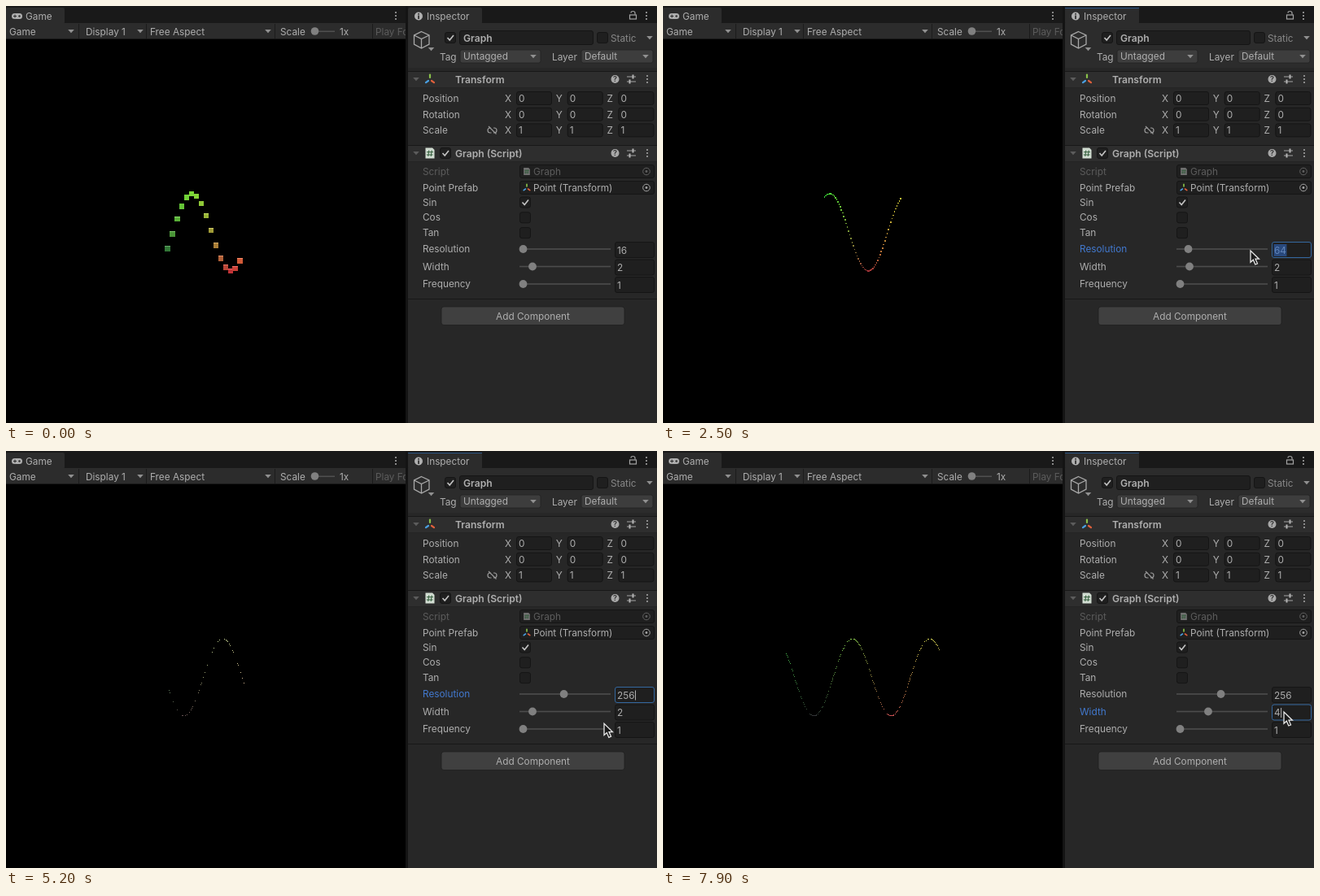
These frames come from a looping animation (800 px wide and 513 px high, 8 s). An HTML page with a canvas:

```html
<!DOCTYPE html>
<html>
<head>
<meta charset="utf-8">
<style>
html, body { margin: 0; width: 100%; height: 100%; overflow: hidden; background: #000 }
svg, canvas { position: absolute; left: 0; top: 0; display: block }
text { font: 11.8px Inter, sans-serif; fill: #aeaeae; white-space: pre }
.b { font-weight: 600; font-size: 12.1px }
.dim { fill: #5c5c5c }
</style>
</head>
<body>
<svg id="ui" width="800" height="513" viewBox="0 0 800 513"></svg>
<canvas id="view" width="490" height="513"></canvas>
<script>
const LOOP = 8000, STEP = 100;
const ui = document.getElementById('ui');
const ctx = document.getElementById('view').getContext('2d');

// --- static panel pieces ---
const rect = (x, y, w, h, fill, extra = '') =>
  `<rect x="${x}" y="${y}" width="${w}" height="${h}" fill="${fill}" ${extra}/>`;
const text = (x, y, s, cls = '', extra = '') => `<text x="${x}" y="${y}" class="${cls}" ${extra}>${s}</text>`;
const path = (d, stroke, width = 1, fill = 'none', extra = '') =>
  `<path d="${d}" stroke="${stroke}" stroke-width="${width}" fill="${fill}" ${extra}/>`;
const circle = (x, y, r, fill, extra = '') => `<circle cx="${x}" cy="${y}" r="${r}" fill="${fill}" ${extra}/>`;
const field = (x, y, w, h = 17, extra = '') =>
  rect(x + .5, y + .5, w - 1, h - 1, '#1f1f1f', `rx="2.5" stroke="#151515" ${extra}`);
const arrow = (x, y, c = '#909090') => path(`M${x - 3.8} ${y - 2}h7.6l-3.8 4.2z`, 'none', 0, c);
const dots = (x, y) => [-4, 0, 4].map(d => rect(x - .9, y + d - .9, 1.8, 1.8, '#a4a4a4')).join('');
const check = (x, y, on) => field(x, y, 14, 14) +
  (on ? path(`M${x + 3.5} ${y + 7}l2.7 3 4.8-6`, '#c4c4c4', 1.6) : '');
const dropdown = (x, w, s) => rect(x, 54, w, 16, '#3d3d3d', 'rx="2.5" stroke="#222" stroke-width=".8"') +
  text(x + 4, 66, s) + arrow(x + w - 9, 62);
const axes = (x, y, k) => `<g transform="translate(${x} ${y}) scale(${k})" stroke-linecap="round">` +
  path('M0-2V-5.5', '#8bc34a', 2.2) + path('M-2 2L-5 4.2', '#4a9fe0', 2.2) + path('M2 2L5 4.2', '#e0603c', 2.2) + '</g>';
const page = (x, y, k, c) => `<g transform="translate(${x} ${y}) scale(${k})">` +
  path('M-5.5-6.5H3L5.5-4V6.5H-5.5z', 'none', 0, c) +
  path('M-1.2-3.5L-2.2 4M2.2-3.5L1.2 4M-4-1.3H4M-4.2 2H3.6', '#2f5a38', 1) + '</g>';
const picker = (x, y, c) => circle(x, y, 4.3, 'none', `stroke="${c}"`) + circle(x, y, 1.4, c);
const header = (y, name) =>
  rect(494, y, 306, 19, '#2e2e2e') + rect(494, y - 1, 306, 1, '#181818') + rect(494, y + 19, 306, 1, '#242424') +
  arrow(504, y + 9, '#5c5c5c') + text(552, y + 13.5, name, 'b') +
  circle(748.5, y + 9, 5, '#a8a8a8') +
  text(748.5, y + 12.3, '?', 'b', 'text-anchor="middle" style="font-size:9px;fill:#2e2e2e"') +
  path(`M763 ${y + 6}h11M763 ${y + 12}h11`, '#a4a4a4', 1.2) +
  path(`M770.5 ${y + 3.5}v5M766.5 ${y + 9.5}v5`, '#b4b4b4', 2) + dots(788, y + 9);

const gamePanel = () =>
  rect(0, 0, 800, 22, '#191919') + rect(0, 2, 72, 20, '#2c2c2c', 'rx="2"') +
  rect(0, 21, 491, 20, '#2c2c2c') + rect(0, 40, 491, 1, '#171717') +
  rect(7, 9, 13, 7, '#aeaeae', 'rx="3.5"') + path('M9 12.5h4M11 10.5v4', '#2c2c2c') +
  circle(16.5, 12.5, 1.2, '#2c2c2c') +
  text(24, 17, 'Game') + dots(479, 12) +
  [89, 172, 330, 450].map(x => rect(x, 22, 1, 18, '#1b1b1b')).join('') +
  text(4, 35.5, 'Game') + arrow(80, 31) + text(98, 35.5, 'Display 1') + arrow(165, 31) +
  text(177, 35.5, 'Free Aspect') + arrow(322, 31) + text(337, 35.5, 'Scale') +
  rect(375, 30.5, 29, 1.5, '#505050') + circle(379.5, 31, 4.8, '#808080') + text(410, 35.5, '1x') +
  text(454, 35.5, 'Play Focused', 'dim') + rect(491, 0, 3, 513, '#141414');

const objectHeader = () =>
  rect(494, 21, 306, 492, '#272727') + rect(494, 2, 91, 20, '#2c2c2c', 'rx="2"') +
  rect(494, 21, 306, 55, '#2c2c2c') +
  circle(507, 12.5, 5, '#b0b0b0') + rect(506.2, 11.5, 1.7, 4.5, '#2c2c2c') + rect(506.2, 9, 1.7, 1.6, '#2c2c2c') +
  text(517, 17, 'Inspector') +
  rect(766.5, 11, 8, 5, 'none', 'stroke="#a4a4a4" stroke-width="1.2"') +
  path('M768 8.5q0-2 2.5-2t2.5 2v2', '#a4a4a4', 1.2) + dots(787, 12) +
  path('M510.5 31.5L520 36V47L510.5 52 501.5 47V36zM501.5 36l9 4.5 9.5-4.5M510.5 40.5V52', '#a8a8a8', 1.3) +
  arrow(522.5, 53) + check(539, 32, true) + field(557, 30, 165, 18) + text(562, 43.5, 'Graph', 'b') +
  check(726, 32) + text(743, 43.5, 'Static', '', 'style="fill:#888"') + arrow(791, 39) +
  text(533, 66.5, 'Tag') + dropdown(558, 99, 'Untagged') + text(671, 66.5, 'Layer') + dropdown(707, 88, 'Default');

const transformPart = () => header(81, 'Transform') + axes(521, 90, 1) +
  ['Position', 'Rotation', 'Scale'].map((name, i) => {
    const y = 105 + i * 19.7;
    return text(512, y + 13, name) + ['X', 'Y', 'Z'].map((axis, j) => {
      const x = 627 + j * 62.7;
      return text(x - 14, y + 13, axis) + field(x, y, 44) + text(x + 3, y + 13, i < 2 ? 0 : 1);
    }).join('');
  }).join('') +
  path('M596 150h-1a3 3 0 0 0 0 6h1.5M599 150h1a3 3 0 0 1 0 6H599M593 148l9.5 9.5', '#999', 1.2);

const scriptPart = () => header(172, 'Graph (Script)') + page(521, 181, 1, '#d2ddd2') + check(533, 174, true) +
  text(512, 208, 'Script', 'dim') + field(631, 195, 166) + page(640, 203.5, .7, '#707070') +
  text(648, 208, 'Graph', 'dim') + picker(787, 203.5, '#606060') +
  text(512, 227.5, 'Point Prefab') + field(631, 215, 166) + axes(640, 223.5, .75) +
  text(648, 227.5, 'Point (Transform)') + picker(787, 223.5, '#a4a4a4') +
  ['Sin', 'Cos', 'Tan'].map((s, i) => text(512, 245.5 + i * 18.8, s) + check(631, 234.5 + i * 18.8, !i)).join('') +
  rect(494, 360, 306, 1, '#181818') +
  rect(535, 370, 225, 22.5, '#404040', 'rx="3" stroke="#1f1f1f" stroke-width=".8"') +
  text(647.5, 385.5, 'Add Component', '', 'text-anchor="middle"');

const sliderRow = (i, name) => {
  const y = 299 + i * 21.5;
  return text(512, y + 4.3, name) + rect(631, y - .8, 112, 1.6, '#4c4c4c') +
    circle(635.5, y, 4.9, '#808080') + field(748, y - 9, 49, 20) +
    rect(750.5, y - 6, 0, 15, '#29497c') + text(751, y + 5.8, '') + rect(0, y - 4.5, 1, 12, '#b4b4b4');
};

ui.innerHTML = gamePanel() + objectHeader() + transformPart() + scriptPart() +
  ['Resolution', 'Width', 'Frequency'].map((s, i) => `<g class="row">${sliderRow(i, s)}</g>`).join('') +
  '<g id="focus">' + rect(494, 2, 91, 1, '#2c5685') + '</g>' +
  '<g id="mouse">' +
  path('M0 0V14.2L3.3 11.2 5.8 17 8.5 15.8 6 10.2H10.4z', '#e6e6e6', 1.3, '#1a1a1a') + '</g>';

const rows = [...document.querySelectorAll('.row')].map(g => {
  const [label, value] = g.querySelectorAll('text');
  const [, box, mark, caret] = g.querySelectorAll('rect');
  return { label, value, box, mark, caret, knob: g.querySelector('circle') };
});

// --- timeline: [start, typed text, selected] ---
const edits = [
  [[0, '16'], [1000, '16', 1], [1800, '6'], [2000, '64'], [2300, '64', 1], [2900, '1'], [3100, '12'],
   [3300, '128'], [3900, '128', 1], [4250, '2'], [4400, '25'], [4600, '256']],
  [[0, '2'], [6200, '2', 1], [7400, '4']],
  [[0, '1']]
];
const pointer = [[400, 805, 85], [900, 780, 303], [1500, 780, 303], [2200, 722, 301], [2600, 722, 301],
  [3100, 771, 304], [4500, 771, 304], [5000, 735, 335], [5700, 735, 337], [6200, 748, 321], [6400, 748, 321],
  [6800, 755, 334], [7200, 758, 333], [7700, 763, 321], [8000, 763, 321]];
const knobX = [v => 632.2 + v * .2085, v => 624 + v * 11.5, () => 635.5];

function pointerAt(t) {
  const i = pointer.findIndex(p => p[0] > t);
  if (i < 1) return [805, 85];
  const [a, b] = [pointer[i - 1], pointer[i]];
  const u = (t - a[0]) / (b[0] - a[0]), k = u * u * (3 - 2 * u);
  return [a[1] + (b[1] - a[1]) * k, a[2] + (b[2] - a[2]) * k];
}

function updateRow(i, t, focus) {
  const r = rows[i], on = i === focus;
  const [, str, selected] = edits[i].findLast(e => e[0] <= t);
  const number = i ? +str : Math.max(16, +str);
  r.value.textContent = str;
  const w = r.value.getComputedTextLength();
  r.label.style.fill = on ? '#4279cf' : '';
  r.value.style.fill = on && selected ? '#6285b9' : '';
  r.box.setAttribute('stroke', on ? '#34689f' : '#151515');
  r.mark.setAttribute('width', on && selected ? w + 1 : 0);
  r.caret.setAttribute('x', 751.5 + w);
  r.caret.setAttribute('visibility', on && !selected ? 'visible' : 'hidden');
  r.knob.setAttribute('cx', knobX[i](number));
  return number;
}

const shade = v => 50 + 165 * Math.max(0, v) ** .7;
// Cover only pixels whose centre lies inside the cube face
const snap = v => Math.ceil(v - .5);

function drawGraph(t, count, width) {
  const unit = 47.5, step = width / count, half = step * unit * .53;
  const phase = .86 + t / 1000 * 1.002;
  const saturation = Math.min(1, step * unit * 1.1); // sparse dots look grey
  ctx.clearRect(0, 0, 490, 513);
  for (let k = 0; k < count; k++) {
    const x = k * step - width / 2, y = Math.sin(Math.PI * (x + phase));
    const px = 246 + x * unit, py = 278.4 - y * unit;
    const rgb = [shade(Math.min(1, x / 2 + .5)), shade(y / 2 + .5), 55];
    const grey = Math.max(...rgb);
    const color = lift => `rgb(${rgb.map(c => grey + (c - grey) * saturation + lift)})`;
    const left = snap(px - half), top = snap(py - half);
    const w = snap(px + half) - left, h = snap(py + half) - top;
    ctx.fillStyle = color(0);
    ctx.fillRect(left, top, w, h);
    if (half > 2 && y < .6) {
      ctx.fillStyle = color(50);
      ctx.fillRect(left, top, w, 1);
    }
  }
}

function frame() {
  const t = Math.floor(performance.now() % LOOP / STEP) * STEP;
  const focus = t < 1000 ? -1 : t < 6200 ? 0 : 1;
  const [count, width] = rows.map((_, i) => updateRow(i, t, focus));
  document.getElementById('focus').setAttribute('visibility', focus < 0 ? 'hidden' : 'visible');
  document.getElementById('mouse').setAttribute('transform', `translate(${pointerAt(t)})`);
  drawGraph(t, count, width);
  requestAnimationFrame(frame);
}
frame();
</script>
</body>
</html>
```
